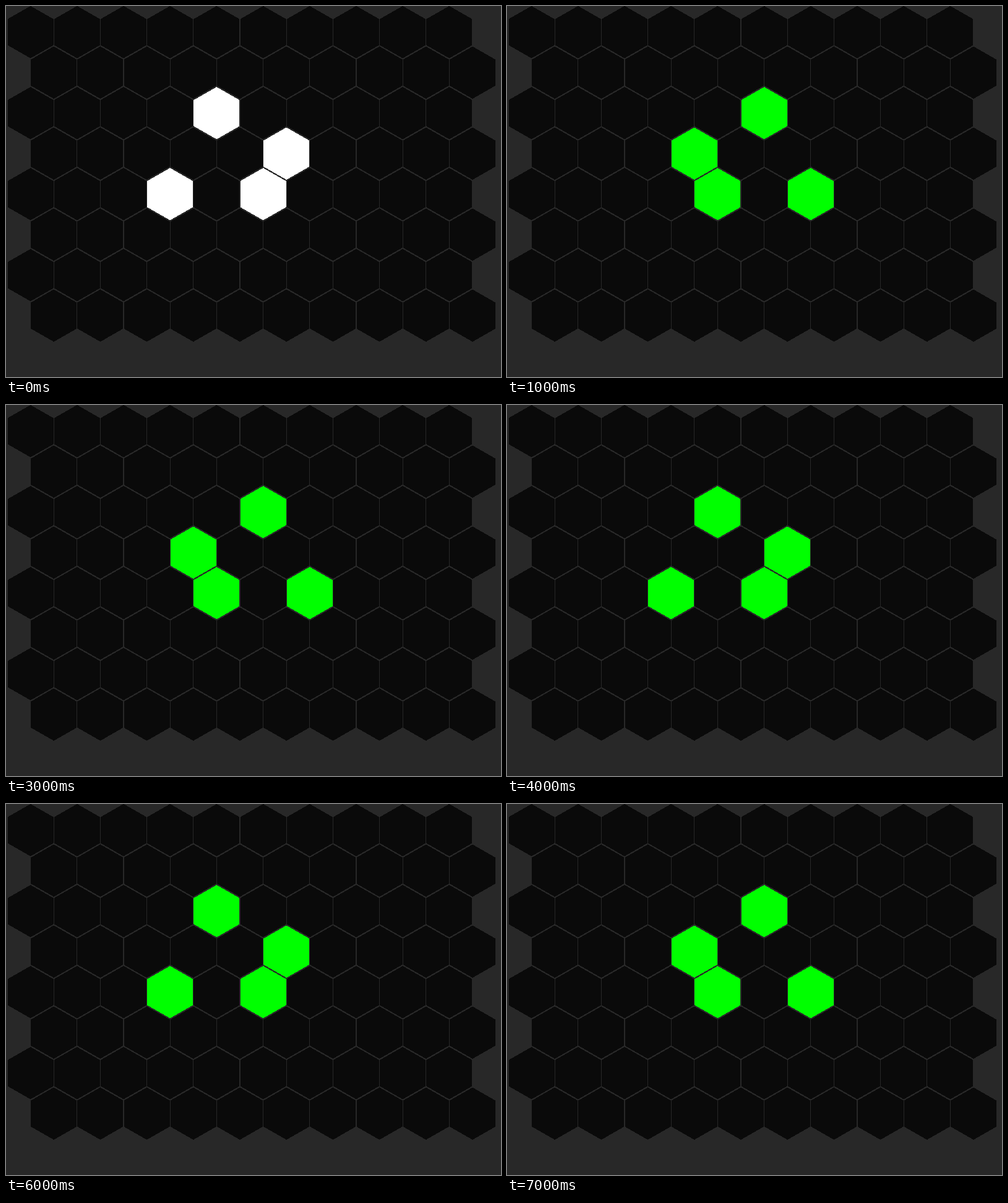
Animation, 800 px wide and 600 px high, one loop 8 s. Source, as an HTML page:

```html
<!DOCTYPE html>
<html lang="en">
<head>
<meta charset="utf-8">
<title>Hexagonal cells</title>
<style>
  html, body { margin: 0; width: 100%; height: 100%; overflow: hidden; background: #282828; }
  svg { display: block; width: 800px; height: 600px; shape-rendering: crispEdges; }
  #grid { fill: #0a0a0a; }
  #even { fill: #0f0; animation: show 2s step-end infinite, start 8s step-end infinite; }
  #odd { fill: #0f0; visibility: hidden; animation: show 2s -1s step-end infinite; }
  @keyframes show { 0% { visibility: visible; } 50%, 100% { visibility: hidden; } }
  @keyframes start { 0% { fill: #fff; } 12.5%, 100% { fill: #0f0; } }
</style>
</head>
<body>
<svg viewBox="0 0 800 600">
  <path id="grid"/>
  <path id="even"/>
  <path id="odd"/>
</svg>
<script>
  const COLS = 10, ROWS = 8;
  const STEP_X = 75.2, STEP_Y = 65.5;
  const HALF_W = 37, RADIUS = 42.3;

  function hex([col, row]) {
    const x = 39.6 + STEP_X * (col + (row % 2) / 2);
    const y = 42.2 + STEP_Y * row;
    const side = RADIUS / 2;
    return `M${x} ${y - RADIUS}l${HALF_W} ${side}v${RADIUS}l${-HALF_W} ${side}` +
      `l${-HALF_W} ${-side}v${-RADIUS}z`;
  }

  function draw(id, cells) {
    document.getElementById(id).setAttribute('d', cells.map(hex).join(''));
  }

  draw('grid', Array.from({ length: COLS * ROWS }, (_, i) => [i % COLS, Math.floor(i / COLS)]));
  draw('even', [[4, 2], [5, 3], [3, 4], [5, 4]]);
  draw('odd', [[5, 2], [3, 3], [4, 4], [6, 4]]);
</script>
</body>
</html>
```
